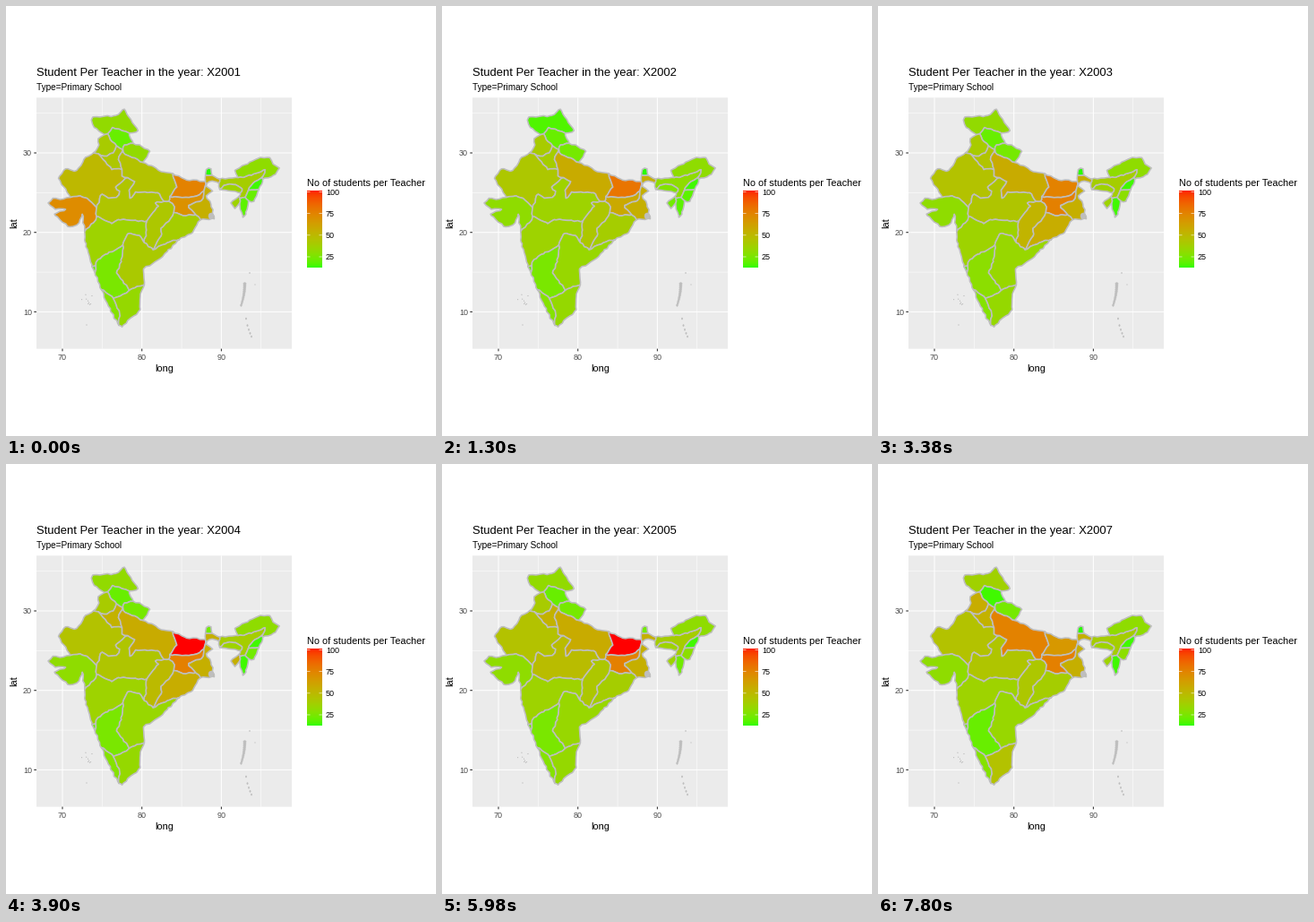
A matplotlib script for the animation above (8 s loop, 480 by 480 pixels).

```python
import matplotlib.pyplot as plt
import numpy as np
from matplotlib.animation import FuncAnimation
from matplotlib.patches import Ellipse, Polygon, Rectangle

plt.rcParams["font.family"] = "Liberation Sans"

SIZE, DPI = 480, 72  # at 72 dpi one point is one pixel
STEP, FRAMES, INTERVAL = 13, 80, 100
YEARS = range(2001, 2008)
LOW, HIGH = 12.6, 101.7
GREY = "#bebebe"
rng = np.random.default_rng(4)


def ramp(value):
    """Green to red, blended in Lab."""
    t = np.clip((value - LOW) / (HIGH - LOW), 0, 1)
    green, red = np.array([87.73, -86.18, 83.18]), np.array([53.24, 80.09, 67.2])
    L, a, b = green + (red - green) * t
    fy = (L + 16) / 116
    f = np.array([fy + a / 500, fy, fy - b / 200])
    xyz = np.where(f > 6 / 29, f**3, 3 * (6 / 29) ** 2 * (f - 4 / 29))
    xyz = xyz * [0.95047, 1, 1.08883]
    matrix = np.array([[3.2406, -1.5372, -0.4986],
                       [-0.9689, 1.8758, 0.0415],
                       [0.0557, -0.2040, 1.0570]])
    rgb = np.clip(matrix @ xyz, 0, 1)
    return np.where(rgb > 0.0031308, 1.055 * rgb ** (1 / 2.4) - 0.055, 12.92 * rgb)


# ---------- geometry ----------
def px(lon):
    return 63 + 8.87 * (lon - 70)


def py(lat):
    return 164 + 8.87 * (30 - lat)


def arc(*stops):
    """Rough curve through (lon, lat) stops; an earlier arc stands for its end."""
    p = np.array([s[-1] if isinstance(s, np.ndarray) else (px(s[0]), py(s[1]))
                  for s in stops])
    slope = 0.6 * np.gradient(p, axis=0)
    out = []
    for a, b, ma, mb in zip(p, p[1:], slope, slope[1:]):
        d = b - a
        length = np.hypot(*d)
        s = np.linspace(0, 1, max(2, int(length / 3)), endpoint=False)[:, None]
        curve = ((2 * s**3 - 3 * s**2 + 1) * a + (s**3 - 2 * s**2 + s) * ma
                 + (3 * s**2 - 2 * s**3) * b + (s**3 - s**2) * mb)
        normal = np.array([-d[1], d[0]]) / length
        curve[1:] += normal * rng.uniform(-0.9, 0.9, (len(s) - 1, 1))
        out.append(curve)
    return np.vstack([*out, p[-1:]])


def gap(p, q):
    return np.hypot(*(p - q))


def ring(first, second, *rest):
    """Chain borders into one outline, turning each to fit the one before."""
    ends = second[0], second[-1]
    if min(gap(first[0], e) for e in ends) < min(gap(first[-1], e) for e in ends):
        first = first[::-1]
    out = first
    for part in (second, *rest):
        if gap(out[-1], part[-1]) < gap(out[-1], part[0]):
            part = part[::-1]
        out = np.vstack([out, part])
    return out


# ---------- figure, panel and legend ----------
fig = plt.figure(figsize=(SIZE / DPI, SIZE / DPI), dpi=DPI, facecolor="white")
ax = fig.add_axes([0, 0, 1, 1])
ax.axis("off")


def line(x, y, color="white", width=1.07):
    ax.plot(x, y, color=color, lw=width, solid_capstyle="butt", snap=False, zorder=1)


def label(x, y, text, size, color="black", **kw):
    return ax.text(x, y, text, fontsize=size, color=color, **kw)


LEFT, RIGHT, TOP, BOTTOM = 34, 319, 102.3, 382.6
ax.add_patch(Rectangle((LEFT, TOP), RIGHT - LEFT, BOTTOM - TOP, fc="#ebebeb",
                       snap=False, zorder=0))
for lon in (75, 85, 95):
    line([px(lon)] * 2, [TOP, BOTTOM], width=0.53)
for lat in (15, 25, 35):
    line([LEFT, RIGHT], [py(lat)] * 2, width=0.53)
for lon in (70, 80, 90):
    line([px(lon)] * 2, [TOP, BOTTOM])
    line([px(lon)] * 2, [BOTTOM, BOTTOM + 2.75], "#333333")
    label(px(lon), 395, str(lon), 9, "#4d4d4d", ha="center")
for lat in (10, 20, 30):
    line([LEFT, RIGHT], [py(lat)] * 2)
    line([LEFT - 2.75, LEFT], [py(lat)] * 2, "#333333")
    label(29, py(lat) + 3.3, str(lat), 9, "#4d4d4d", ha="right")
label(176.5, 408, "long", 11, ha="center")
label(14, 242.3, "lat", 11, ha="right", va="center", rotation=90)
title = label(34, 78, "", 13.05)
label(34, 94, "Type=Primary School", 10)

label(336, 201, "No of students per Teacher", 11)
bar = np.array([[ramp(v)] for v in np.linspace(HIGH - 2.2, LOW + 2.2, 86)])
ax.imshow(bar, extent=(336, 353, 292, 206), aspect="auto",
          interpolation="nearest", zorder=1)
for v in (25, 50, 75, 100):
    y = 304.1 - 0.965 * v
    line([336, 339.5], [y, y], width=0.6)
    line([349.5, 353], [y, y], width=0.6)
    label(357, y + 3.3, str(v), 9)
ax.set_xlim(0, SIZE)
ax.set_ylim(SIZE, 0)

# ---------- outer borders, clockwise from the west ----------
pk_gj = arc((68.2, 23.7), (68.8, 24.3), (70.1, 24.2), (71, 24.4))
pk_rj = arc(pk_gj, (70.2, 25.7), (69.5, 26.8), (70.4, 28), (71.8, 27.8), (72.7, 29.2),
            (73.9, 30))
pk_pb = arc(pk_rj, (74.6, 31), (74.5, 31.8), (75.3, 32.3))
cn_jk = arc(pk_pb, (74, 33.2), (73.8, 34.5), (76.7, 34.7), (77.8, 35.5), (78.3, 34.6),
            (78.8, 33.8), (79.5, 32.8), (78.4, 32.5))
cn_hp = arc(cn_jk, (78.9, 31.2))
cn_uk = arc(cn_hp, (80, 30.8), (81, 30.2), (80.1, 28.8))
np_up = arc(cn_uk, (81.2, 28.4), (82.7, 27.6), (83.9, 27.4))
np_br = arc(np_up, (85.4, 26.7), (88, 26.4))
np_wb = arc(np_br, (88, 27.2))
cn_sk = arc(np_wb, (88.1, 27.9), (88.7, 28), (88.8, 27.2))
bt_wb = arc(cn_sk, (89.8, 26.7))
as_bt = arc(bt_wb, (92.1, 26.9))
cn_ar = arc(as_bt, (91.7, 27.8), (93.3, 28.6), (94.6, 29.3), (96.1, 29.4), (96.5, 28.6),
            (97.3, 28.1), (96.8, 27.3), (95.2, 26.7))
mm_nl = arc(cn_ar, (95.1, 26.1), (94.7, 25.4))
mm_mn = arc(mm_nl, (94.1, 23.9), (93.4, 24))
bd_mz = arc(mm_mn, (93.1, 22.3), (92.7, 21.9), (92.3, 23.7))
bd_tr = arc(bd_mz, (91.7, 23), (91.2, 23.7), (92.2, 24.5))
bd_as = arc(bd_tr, (92.4, 25))
bd_ml = arc(bd_as, (89.8, 25.4))
as_bd = arc(bd_ml, (89.7, 26.2))
bd_wb = arc(as_bd, (88.5, 26.4), (88.1, 25.8), (88.9, 25.2), (88.1, 24.6), (88.7, 23.5),
            (89.1, 21.7))
wb_coast = arc(bd_wb, (87.4, 21.6))
od_coast = arc(wb_coast, (86.9, 20.9), (86.4, 20), (84.7, 19.1))
ap_coast = arc(od_coast, (83.2, 17.6), (82.3, 16.7), (81, 15.8), (80.2, 15.4),
               (80.3, 13.4))
tn_coast = arc(ap_coast, (79.8, 11.9), (79.8, 10.3), (79, 9.5), (78.2, 8.9), (77.5, 8.1),
               (77.1, 8.3))
kl_coast = arc(tn_coast, (76.2, 9.9), (74.9, 12.8))
ka_coast = arc(kl_coast, (74.1, 14.9))
ga_coast = arc(ka_coast, (73.7, 15.7))
mh_coast = arc(ga_coast, (72.8, 19), (72.8, 20.1))
gj_coast = arc(mh_coast, (72.6, 21.5), (72.5, 22.3), (72.1, 21.2), (70.9, 20.7),
               (69, 22.3), (70.4, 22.9), (69.1, 22.9), pk_gj[:1])

# ---------- inner borders ----------
jk_pb = arc(pk_pb, (75.7, 32.4))
hp_jk = arc(jk_pb, (76.3, 33.2), (77.5, 32.8), cn_jk)
hp_pb = arc(jk_pb, (76, 31.7), (76.8, 30.9))
hp_hr = arc(hp_pb, (77.6, 30.4))
hp_uk = arc(hp_hr, (77.8, 31), cn_hp)
uk_up = arc(hp_hr, (77.9, 29.8), (78.8, 29.4), cn_uk)
hr_up = arc(hp_hr, (77.1, 29.5), (77.5, 27.9))
pb_rj = arc(pk_rj, (74.5, 29.9))
hr_pb = arc(hp_pb, (76.4, 30), (75.2, 29.6), pb_rj)
hr_rj = arc(pb_rj, (75.4, 28.9), (76.2, 27.9), (76.8, 28), hr_up)
rj_up = arc(hr_up, (77.5, 27.1), (78.2, 26.9))
mp_up = arc(rj_up, (79.1, 26.4), (78.4, 25.3), (78.5, 24.3), (79.2, 25.1), (80.4, 25.1),
            (82, 25), (82.8, 23.9))
cg_up = arc(mp_up, (83.4, 23.9))
jh_up = arc(cg_up, (83.5, 24.5))
br_up = arc(jh_up, (84.4, 25.7), (84.1, 26.6), np_up)
br_jh = arc(jh_up, (86.5, 24.5), (87.8, 25.2))
br_wb = arc(br_jh, np_br)
jh_wb = arc(br_jh, (87.5, 24), (85.9, 23.4), (86.8, 22.2))
od_wb = arc(jh_wb, wb_coast)
jh_od = arc(jh_wb, (85.2, 22.1), (84, 22.5))
cg_jh = arc(cg_up, (84.1, 23.2), jh_od)
cg_od = arc(jh_od, (83.4, 21.4), (82.4, 20.5), (82.5, 19.8), (81.4, 17.8))
ap_od = arc(cg_od, (83.2, 18.7), od_coast)
ap_cg = arc(cg_od, (80.3, 18.7))
cg_mh = arc(ap_cg, (80.5, 20), (80.6, 21.4))
cg_mp = arc(cg_mh, (81.4, 22.5), (82.1, 23.3), (81.7, 23.7), mp_up)
mh_mp = arc(cg_mh, (78.9, 21.5), (77, 21.6), (76.2, 21.1), (74.3, 22))
gj_mh = arc(mh_mp, (73.9, 21.2), mh_coast)
gj_mp = arc(mh_mp, (74.3, 23.1))
gj_rj = arc(gj_mp, (73.4, 24), (72.2, 24.6), pk_gj)
mp_rj = arc(gj_mp, (75, 24.8), (75.8, 24.3), (76.8, 24.4), (77.2, 25.2), (76.7, 25.7),
            rj_up)
ga_mh = arc(ga_coast, (74.2, 15.8))
ga_ka = arc(ga_mh, ka_coast)
ka_mh = arc(ga_mh, (74.5, 16.6), (75.7, 17.3), (77.6, 18.4))
ap_mh = arc(ka_mh, (78.2, 19.8), (79.7, 19.6), ap_cg)
ap_ka = arc(ka_mh, (77.4, 16.3), (76.8, 14.9), (77.6, 13.9), (78.4, 12.7))
ap_tn = arc(ap_ka, (79.4, 13.2), ap_coast)
ka_tn = arc(ap_ka, (77.6, 12.2), (76.4, 11.7))
ka_kl = arc(ka_tn, kl_coast)
kl_tn = arc(ka_tn, (76.8, 10.8), (77.2, 9.8), tn_coast)
sk_wb = arc(np_wb, cn_sk)
as_wb = arc(bt_wb, as_bd)
ar_as = arc(as_bt, (93.8, 27.2), (95.5, 27.9), (95.2, 27))
ar_nl = arc(ar_as, cn_ar)
as_nl = arc(ar_as, (94, 26.2), (93.4, 25.3))
mn_nl = arc(as_nl, mm_nl)
as_mn = arc(as_nl, (93, 24.4))
mn_mz = arc(as_mn, mm_mn)
as_mz = arc(as_mn, (92.3, 24.2))
mz_tr = arc(as_mz, bd_mz)
as_tr = arc(as_mz, bd_tr)
as_ml = arc(bd_ml, (90.3, 25.9), (91.8, 26), (92.6, 25.5), bd_as)

# ---------- states: usual value, outline, unusual years ----------
states = []


def state(usual, *borders, **unusual):
    patch = Polygon(ring(*borders), ec=GREY, lw=1.6, joinstyle="round", zorder=3)
    colors = [ramp(unusual.get(f"y{year}", usual)) for year in YEARS]
    states.append((ax.add_patch(patch), colors))


state(33, cn_jk, hp_jk, jk_pb, y2002=18, y2007=38)
state(22, cn_hp, hp_uk, hp_hr, hp_pb, hp_jk, y2007=16)
state(41, pk_pb, jk_pb, hp_pb, hr_pb, pb_rj, y2006=52, y2007=56)
state(25, cn_uk, uk_up, hp_uk, y2001=33)
state(54, hr_pb, hp_hr, hr_up, hr_rj, y2001=43, y2002=40, y2003=45, y2006=62)
state(46, pk_rj, pb_rj, hr_rj, rj_up, mp_rj, gj_rj, y2001=51, y2002=43)
state(32, gj_coast, pk_gj, gj_rj, gj_mp, gj_mh, y2001=71)
state(44, mp_up, cg_mp, mh_mp, gj_mp, mp_rj, y2002=37, y2005=49)
state(57, np_up, br_up, jh_up, cg_up, mp_up, rj_up, hr_up, uk_up, y2001=46, y2007=75)
state(75, np_br, br_wb, br_jh, br_up,
      y2002=80, y2004=102, y2005=102, y2006=89, y2007=66)
state(76, br_jh, jh_wb, jh_od, cg_jh, jh_up, y2001=69, y2002=58)
state(43, cg_jh, cg_od, ap_cg, cg_mh, cg_mp, cg_up, y2003=53, y2004=50)
state(40, jh_od, cg_od, ap_od, od_coast, od_wb, y2003=56, y2004=56)
state(55, np_wb, sk_wb, bt_wb, as_wb, bd_wb, wb_coast, od_wb, jh_wb, br_wb, y2006=48)
state(37, mh_coast, gj_mh, mh_mp, cg_mh, ap_mh, ka_mh, ga_mh)
state(35, ap_coast, ap_tn, ap_ka, ap_mh, ap_cg, ap_od, y2001=42)
state(22, ga_coast, ga_mh, ga_ka)
state(26, ka_coast, ga_ka, ka_mh, ap_ka, ka_tn, ka_kl, y2003=31, y2007=22)
state(29, kl_coast, kl_tn, ka_kl)
state(34, tn_coast, kl_tn, ka_tn, ap_tn, y2007=46)
state(14, cn_sk, sk_wb, y2004=24, y2005=24)
state(40, as_bt, ar_as, as_nl, as_mn, as_mz, as_tr, bd_as, as_ml, as_bd, as_wb, y2002=32)
state(32, cn_ar, ar_nl, ar_as)
state(16, mm_nl, mn_nl, as_nl, ar_nl)
state(31, mm_mn, mn_mz, as_mn, mn_nl, y2001=22, y2002=20, y2004=24)
state(16, bd_mz, mz_tr, as_mz, mn_mz, y2001=20, y2002=20, y2005=24)
state(37, bd_tr, as_tr, mz_tr, y2002=24, y2004=55)
state(37, bd_ml, as_ml, y2002=28)


# ---------- delta and islands ----------
def islet(x, y, w, h):
    ax.add_patch(Ellipse((x, y), w, h, fc=GREY, ec=GREY, lw=0.5, zorder=4))


islet(229, 234.5, 6, 7)
for t in np.linspace(0, 1, 12):
    islet(266.5 - 4 * t**2, 310 + 24 * t, 3.2 - 1.5 * t, 2.6)
for t in np.linspace(0, 1, 5):
    islet(268 + 6 * t, 349 + 20 * t**0.7, 1.3, 2)
islet(272, 298, 1, 1)
islet(278, 311, 0.6, 0.6)
for x, y in rng.uniform((82, 320), (96, 341), (9, 2)):
    islet(x, y, 0.7, 0.7)
islet(90, 356, 0.7, 0.7)


# ---------- animation ----------
def draw(i):
    step = i // STEP
    title.set_text(f"Student Per Teacher in the year: X{YEARS[step]}")
    for patch, colors in states:
        patch.set_facecolor(colors[step])
    return [title] + [patch for patch, _ in states]


anim = FuncAnimation(fig, draw, frames=FRAMES, interval=INTERVAL,
                     repeat=True, repeat_delay=0, blit=False)
plt.show()
```
